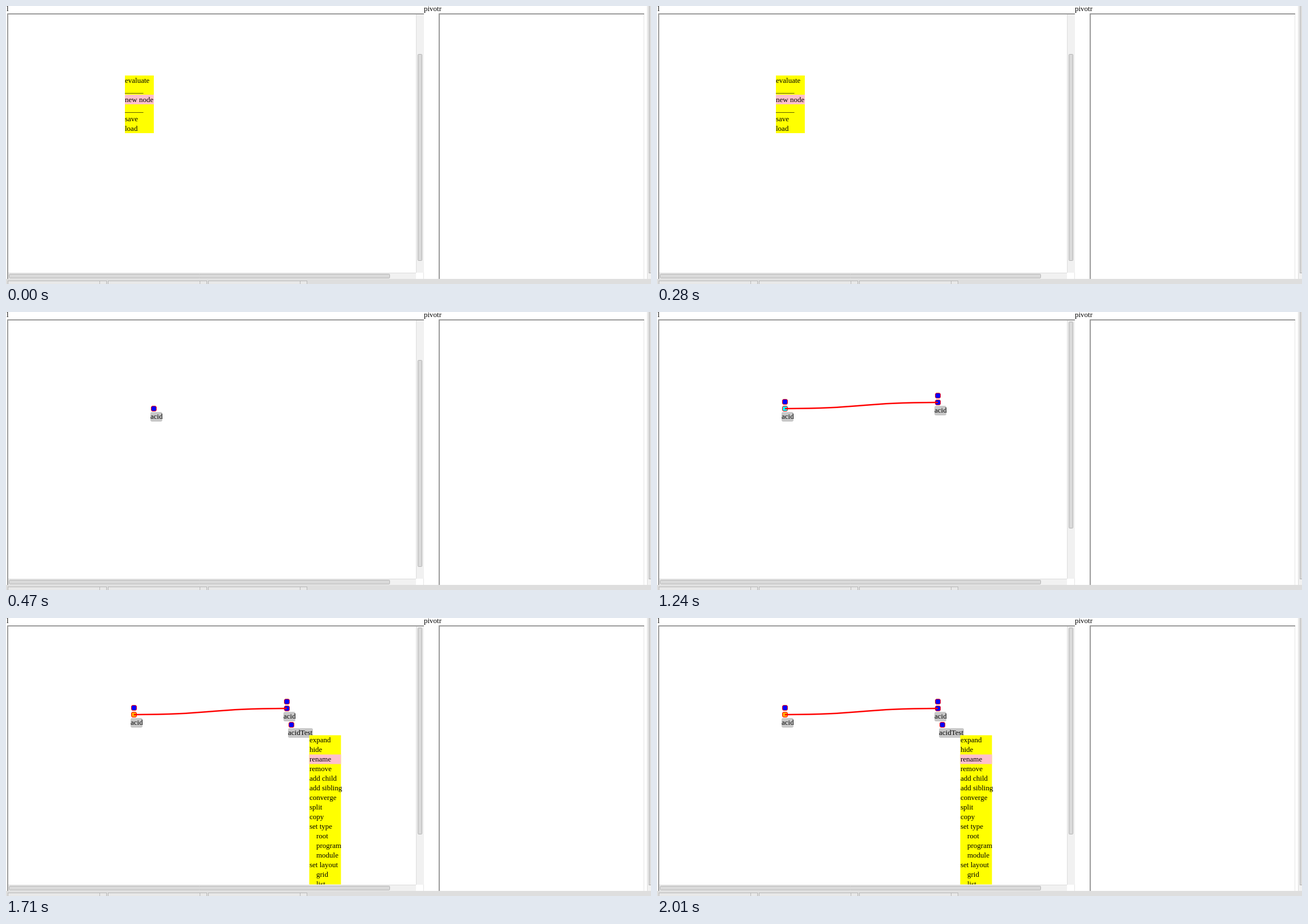
These frames come from a looping animation (1139x492 px, 2210 ms). An HTML page with a canvas:

```html
<!DOCTYPE html>
<html lang="en">
<head>
<meta charset="utf-8">
<title>Node editor</title>
<style>
  html, body { margin: 0; width: 100%; height: 100%; overflow: hidden; background: #fff; }
  canvas { display: block; }
</style>
</head>
<body>
<canvas id="stage" width="1139" height="492"></canvas>
<script>
const ctx = document.getElementById('stage').getContext('2d');
const LOOP = 2210;
const STEPS = [470, 1240, 1710];
const ROW = 17;
const MAIN_MENU = ['evaluate', '_____', 'new node', '_____', 'save', 'load'];
const NODE_MENU = ['expand', 'hide', 'rename', 'remove', 'add child', 'add sibling',
  'converge', 'split', 'copy', 'set type', '>root', '>program', '>module',
  'set layout', '>grid', '>list'];

function box(x, y, w, h, color) {
  ctx.fillStyle = color;
  ctx.fillRect(x, y, w, h);
}

function rounded(x, y, w, h, r, fill, stroke) {
  ctx.beginPath();
  ctx.roundRect(x, y, w, h, r);
  ctx.fillStyle = fill;
  ctx.fill();
  if (stroke) {
    ctx.lineWidth = 1;
    ctx.strokeStyle = stroke;
    ctx.stroke();
  }
}

function text(str, x, y) {
  ctx.fillStyle = '#000';
  ctx.fillText(str, x, y);
}

function thumb(x, y, w, h) {
  rounded(x + 0.5, y + 0.5, w - 1, h - 1, 1, '#d9d9d9', '#b3b3b3');
}

function panel(x, w) {
  box(x, 13, w, 2, '#9a9a9a');
  box(x, 13, 2, 470, '#9a9a9a');
  box(x + w - 1, 15, 1, 468, '#e4e4e4');
}

function chrome(scrollTop) {
  box(0, 0, 1139, 492, '#fff');
  text('l', 1, 9);
  text('pivotr', 738, 9);
  panel(2, 736);
  panel(764, 363);

  box(724, 15, 14, 457, '#f1f1f1');
  box(724, 15, 1, 457, '#dcdcdc');
  thumb(727, scrollTop, 8, 366);
  box(4, 472, 720, 11, '#f1f1f1');
  box(4, 472, 720, 1, '#dcdcdc');
  thumb(5, 474, 673, 8);

  box(1132, 0, 7, 483, '#f1f1f1');
  box(1132, 0, 1, 483, '#dcdcdc');
  box(1135, 0, 4, 473, '#d9d9d9');
  box(1135, 0, 1, 473, '#b3b3b3');
  box(1135, 472, 4, 1, '#b3b3b3');

  box(0, 483, 1139, 9, '#dedede');
  for (const x of [3, 180, 357]) {
    box(x, 486, 175, 6, '#e8e8e8');
    box(x, 486, 175, 1, '#b8b8b8');
    for (const dx of [0, 162, 174]) box(x + dx, 486, 1, 6, '#b8b8b8');
  }
}

function menu(items, x, y, w, active) {
  box(x, y, w, items.length * ROW, '#ff0');
  box(x, y + active * ROW, w, ROW, '#ffc0cb');
  items.forEach((item, i) => {
    const indent = item[0] === '>' ? 12 : 0;
    text(item.replace('>', ''), Math.round(x) + indent, Math.floor(y) + i * ROW + 13);
  });
}

function dot(x, y, color = '#00f') {
  rounded(x + 0.5, y + 0.5, 9, 9, 2.5, color, '#f00');
}

// A label with its ports stacked above, the nearest port first.
function node(name, x, y, w, ports) {
  ports.forEach((color, i) => dot(x + 1, y - 11 - 12 * i, color));
  rounded(x, y, w, ROW, 3, '#c8c8c8');
  text(name, x, y + 12);
}

function graph(portColor) {
  node('acid', 220, 177, 21, [portColor, '#00f']);
  node('acid', 490, 166, 21, ['#00f', '#00f']);
  ctx.beginPath();
  ctx.moveTo(226, 171);
  ctx.bezierCurveTo(361, 171, 361, 160, 496, 160);
  ctx.lineWidth = 2.5;
  ctx.strokeStyle = '#f00';
  ctx.stroke();
}

const scenes = [
  () => {
    chrome(85);
    menu(MAIN_MENU, 210, 123, 51, 2);
  },
  () => {
    chrome(85);
    node('acid', 255, 177, 21, ['#00f']);
  },
  () => {
    chrome(17);
    graph('#0ff');
  },
  () => {
    chrome(17);
    graph('#ffa500');
    node('acidTest', 498, 195, 44, ['#00f']);
    ctx.save();
    ctx.beginPath();
    ctx.rect(4, 15, 720, 456.5);
    ctx.clip();
    menu(NODE_MENU, 535.5, 207.5, 56, 2);
    ctx.restore();
  }
];

function draw(now) {
  const t = now % LOOP;
  ctx.font = '13px "Liberation Serif", "Times New Roman", serif';
  scenes[STEPS.filter(s => t >= s).length]();
}

const start = performance.now();
function tick() {
  draw(performance.now() - start);
  requestAnimationFrame(tick);
}
tick();
</script>
</body>
</html>
```
